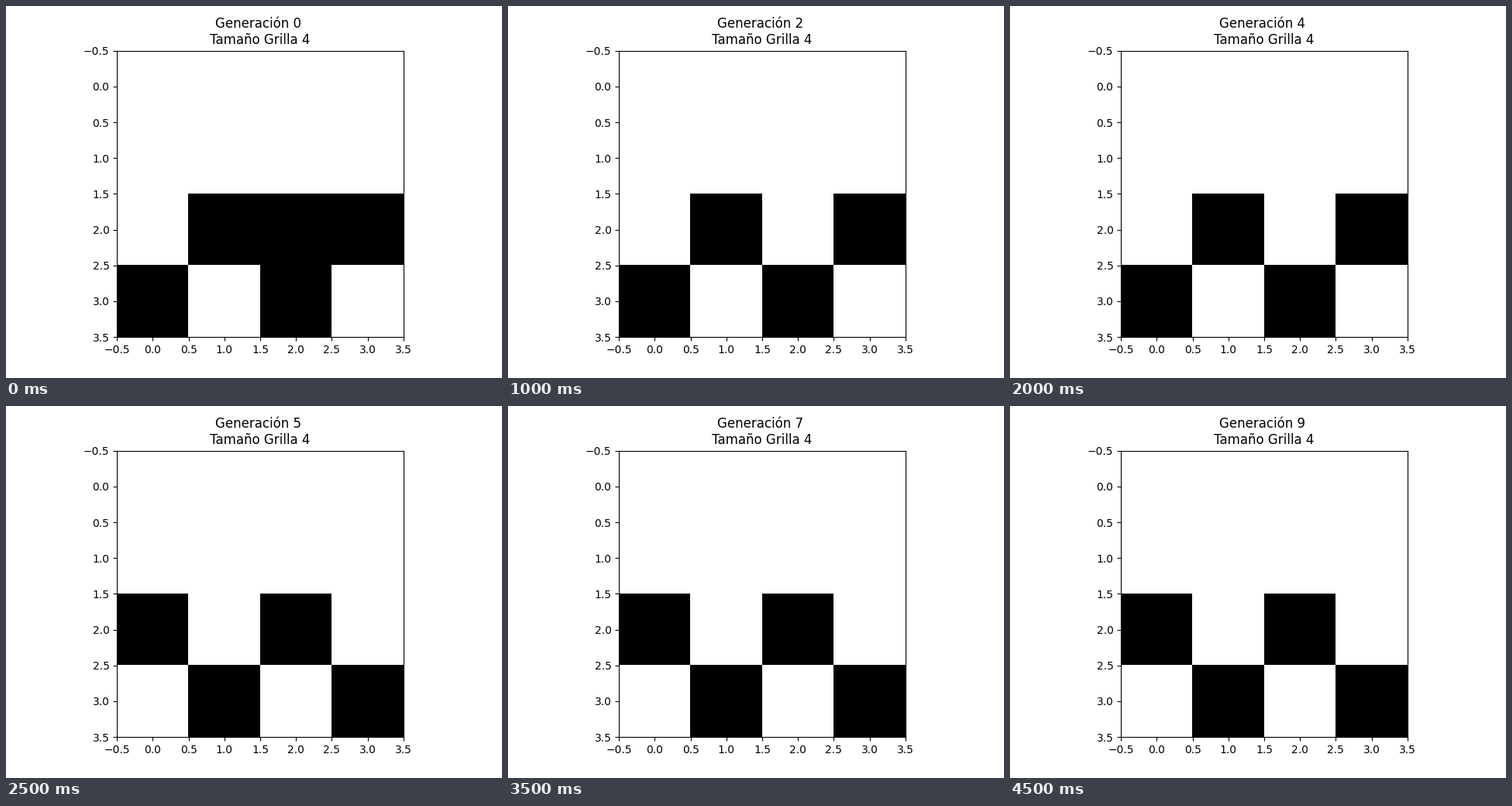
These frames come from a looping animation (640x480 px, 5 s). A matplotlib script:

```python
import numpy as np
import matplotlib.pyplot as plt
from matplotlib.animation import FuncAnimation

SIZE = 4
GENERATIONS = 10
STEP_MS = 500


def next_generation(grid):
    """A cell lives when at least two of its four direct neighbours live."""
    padded = np.pad(grid, 1)
    neighbours = (padded[:-2, 1:-1] + padded[2:, 1:-1]
                  + padded[1:-1, :-2] + padded[1:-1, 2:])
    return (neighbours >= 2).astype(int)


start = np.zeros((SIZE, SIZE), dtype=int)
start[2] = [0, 1, 1, 1]
start[3] = [1, 0, 1, 0]

history = [start]
for _ in range(GENERATIONS - 1):
    history.append(next_generation(history[-1]))

fig, ax = plt.subplots(figsize=(6.4, 4.8), dpi=100)
image = ax.imshow(start, cmap="binary", vmin=0, vmax=1)
title = ax.set_title("")


def update(generation):
    image.set_data(history[generation])
    title.set_text(f"Generación {generation} \nTamaño Grilla {SIZE}")
    return image, title


anim = FuncAnimation(fig, update, frames=GENERATIONS, interval=STEP_MS,
                     repeat=True, repeat_delay=0, blit=False)
plt.show()
```
